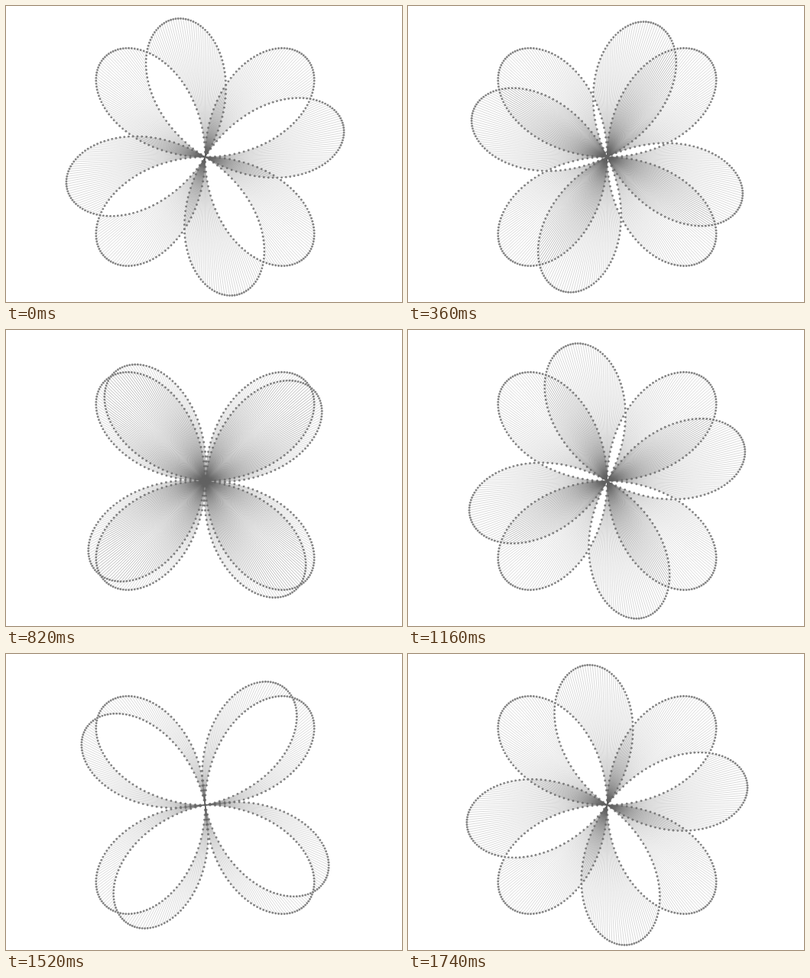
An HTML page with a canvas that plays this animation: 518x388 px, repeating every 1760 ms.

```html
<!DOCTYPE html>
<html lang="en">
<head>
<meta charset="utf-8">
<title>Rotating rose curves</title>
<style>
  html, body { margin: 0; height: 100%; overflow: hidden; background: #fff; }
  canvas { display: block; }
</style>
</head>
<body>
<canvas id="stage" width="518" height="388"></canvas>
<script>
const ctx = document.getElementById('stage').getContext('2d');
const CX = 260.5, CY = 198, RADIUS = 185.4, DOT = 1.45;
const FIRST_TURN = 32, TURN_STEP = 8;
const DELAYS = [60, 100, 100, 100, 100, 120, 120, 120, 120, 120, 100, 80,
                80, 80, 60, 40, 20, 20, 20, 20, 40, 60, 60, 20];
const LOOP = DELAYS.reduce((sum, delay) => sum + delay);
const rad = degrees => degrees * Math.PI / 180;

// Four-petal rose, turned clockwise; the radius keeps its sign.
function rosePoint(angle, turn) {
  const r = RADIUS * Math.sin(2 * rad(angle + turn));
  return [CX + r * Math.cos(rad(angle)), CY - r * Math.sin(rad(angle))];
}

function dot([x, y]) {
  ctx.beginPath();
  ctx.arc(x, y, DOT, 0, 2 * Math.PI);
  ctx.fill();
}

function line([from, to]) {
  ctx.beginPath();
  ctx.moveTo(...from);
  ctx.lineTo(...to);
  ctx.stroke();
}

function draw(turn) {
  ctx.fillStyle = '#fff';
  ctx.fillRect(0, 0, 518, 388);
  ctx.fillStyle = '#868686';
  ctx.strokeStyle = '#626262';
  ctx.lineWidth = 0.24;
  const pairs = Array.from({ length: 360 }, (_, a) => [rosePoint(a, 0), rosePoint(a, turn)]);
  pairs.flat().forEach(dot);
  pairs.forEach(line);
}

function stepAt(time) {
  let step = 0;
  while (time >= DELAYS[step]) time -= DELAYS[step++];
  return step;
}

let shown = -1;
const start = performance.now();
function tick() {
  const step = stepAt((performance.now() - start) % LOOP);
  if (step !== shown) draw(FIRST_TURN + TURN_STEP * step);
  shown = step;
  requestAnimationFrame(tick);
}
tick();
</script>
</body>
</html>
```
